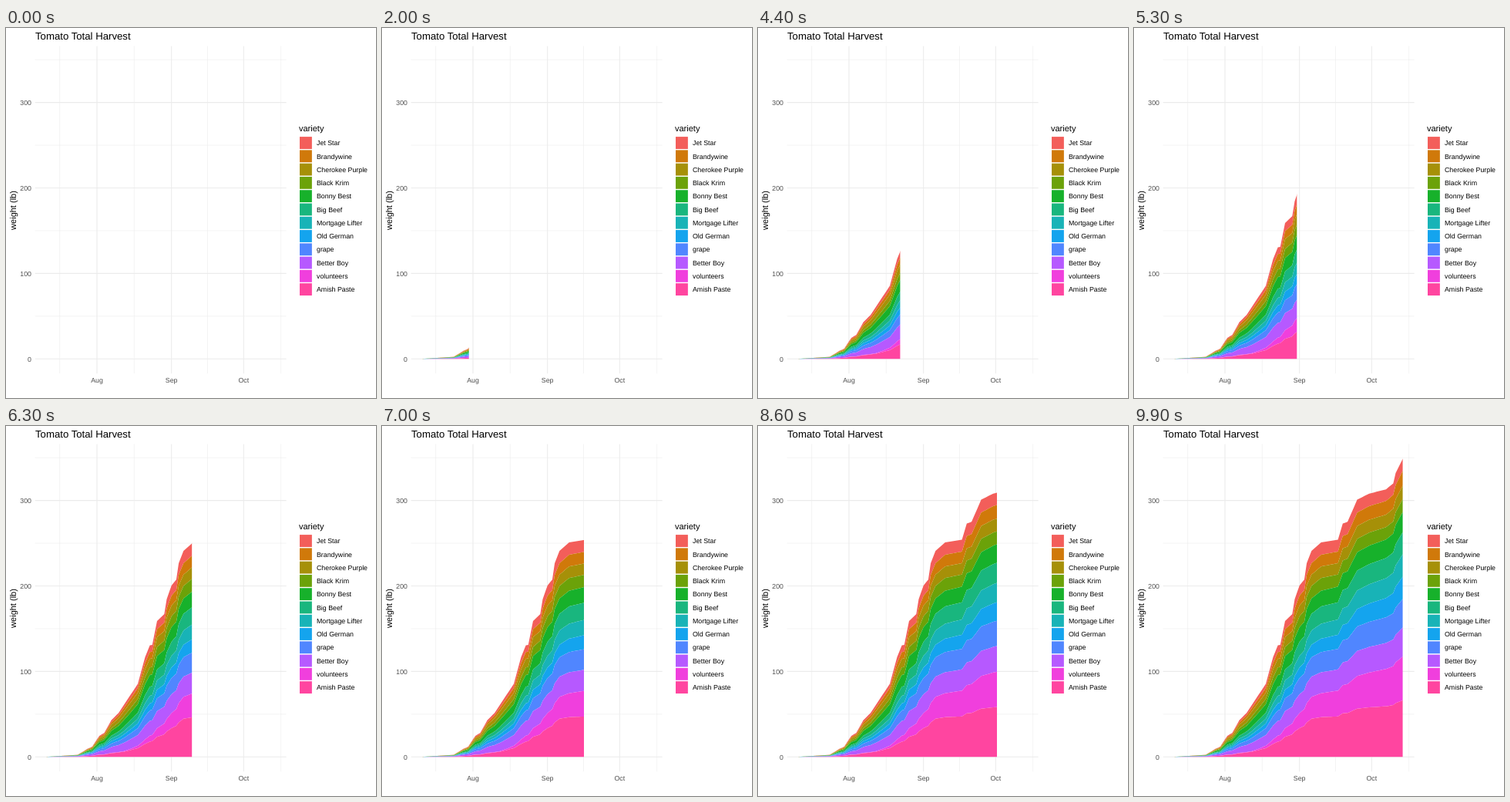
These frames come from a looping animation (480x480 px, 10000 ms). An HTML page:

```html
<!DOCTYPE html>
<html lang="en">
<head>
<meta charset="utf-8">
<title>Tomato Total Harvest</title>
<style>
html, body { margin: 0; width: 100%; height: 100%; overflow: hidden; background: #fff; }
svg { display: block; width: 480px; height: 480px; font-family: "Liberation Sans", Arial, sans-serif; }
text { text-rendering: geometricPrecision; }
.title { font-size: 13.2px; }
.head { font-size: 11px; }
.small { font-size: 8.8px; }
.tick { fill: #4d4d4d; }
.grid { stroke: #ebebeb; }
</style>
</head>
<body>
<svg viewBox="0 0 480 480">
  <clipPath id="clip"><rect id="reveal" x="50" y="20" width="0" height="430"/></clipPath>
  <g id="grid"></g>
  <g id="areas" clip-path="url(#clip)"></g>
  <text class="title" x="38" y="15">Tomato Total Harvest</text>
  <text class="head" transform="translate(13.2 236.5) rotate(-90)" text-anchor="middle">weight (lb)</text>
  <text class="head" x="380" y="134">variety</text>
  <g id="legend"></g>
</svg>
<script>
const NS = "http://www.w3.org/2000/svg";
const LAST_DAY = 95, STEPS = 100, STEP_MS = 100;
const px = day => 52.5 + day * 3.119;
const py = lb => 429.3 - lb * 1.109;

function add(parent, tag, attrs, text) {
  const el = document.createElementNS(NS, tag);
  for (const key in attrs) el.setAttribute(key, attrs[key]);
  if (text) el.textContent = text;
  document.getElementById(parent).append(el);
}

// Top of the stack first; percent of the harvest on each of the share days.
const shareDays = [32, 57, LAST_DAY];
const varieties = [
  { name: "Jet Star", fill: "#f35e5a", shares: [5.9, 6, 4] },
  { name: "Brandywine", fill: "#d0790a", shares: [6.6, 5.5, 5] },
  { name: "Cherokee Purple", fill: "#a69008", shares: [9.5, 5.5, 4.5] },
  { name: "Black Krim", fill: "#6ba209", shares: [7.3, 6.1, 4.3] },
  { name: "Bonny Best", fill: "#17b12b", shares: [13, 7.4, 6.8] },
  { name: "Big Beef", fill: "#19b67e", shares: [8, 8.1, 7.4] },
  { name: "Mortgage Lifter", fill: "#18b3b7", shares: [6.6, 6.9, 7.5] },
  { name: "Old German", fill: "#14a4ee", shares: [6.6, 6.1, 7.5] },
  { name: "grape", fill: "#5086ff", shares: [9.5, 9.4, 9.6] },
  { name: "Better Boy", fill: "#b659ff", shares: [16, 9.8, 9.7] },
  { name: "volunteers", fill: "#f03fdd", shares: [1, 10.7, 14.7] },
  { name: "Amish Paste", fill: "#ff45a0", shares: [10, 18.5, 19] }
];

// Turning points of the whole harvest: day and pounds so far.
const harvest = [[0, .2], [13, 2.5], [17, 9.5], [19, 12], [22, 24.7], [24, 28], [27, 43],
  [30, 51.5], [38, 85.5], [41, 116.5], [43, 130.5], [44, 131], [46, 159], [49, 167],
  [50, 184.5], [52, 200.5], [54, 207.5], [55, 226.5], [57, 241], [61, 251], [68, 254],
  [70, 273], [72, 275], [76, 301], [81, 308], [88, 313], [91, 320], [92, 332], [95, 349]];

// Linear between points, constant before the first one.
function at(points, day) {
  if (day <= points[0][0]) return points[0][1];
  const i = points.findIndex(p => p[0] >= day);
  const [d0, v0] = points[i - 1], [d1, v1] = points[i];
  return v0 + (v1 - v0) * (day - d0) / (d1 - d0);
}

// Upper edges of all bands on one day, ending with the baseline.
function levels(day) {
  const parts = varieties.map(v => at(shareDays.map((d, i) => [d, v.shares[i]]), day));
  const sum = parts.reduce((a, b) => a + b);
  let lb = at(harvest, day);
  const perPart = lb / sum;
  return [lb, ...parts.map(part => lb -= part * perPart)];
}

function drawGrid() {
  const line = (x1, y1, x2, y2, width) =>
    add("grid", "line", { x1, y1, x2, y2, class: "grid", "stroke-width": width });
  const across = (lb, w) => line(37.7, py(lb), 363.6, py(lb), w);
  const down = (day, w) => line(px(day), 23.4, px(day), 448.2, w);
  [50, 150, 250, 350].forEach(lb => across(lb, .53));
  [5.5, 36.5, 67, 97.5].forEach(day => down(day, .53));
  [0, 100, 200, 300].forEach(lb => {
    across(lb, 1.07);
    add("grid", "text", { x: 33, y: py(lb) + 3.2, class: "small tick", "text-anchor": "end" }, String(lb));
  });
  [[21, "Aug"], [52, "Sep"], [82, "Oct"]].forEach(([day, name]) => {
    down(day, 1.07);
    add("grid", "text", { x: px(day), y: 460, class: "small tick", "text-anchor": "middle" }, name);
  });
}

function drawAreas() {
  const days = Array.from({ length: LAST_DAY + 1 }, (_, day) => day);
  const stack = days.map(levels);
  const edge = i => days.map(d => px(d).toFixed(2) + "," + py(stack[d][i]).toFixed(2));
  varieties.forEach(({ fill }, i) => {
    const points = [...edge(i), ...edge(i + 1).reverse()].join(" ");
    add("areas", "polygon", { points, fill });
  });
}

function drawLegend() {
  varieties.forEach(({ name, fill }, i) => {
    const drop = i * 17.28;
    add("legend", "rect", { x: 381, y: 141.1 + drop, width: 15.86, height: 15.86, fill });
    add("legend", "text", { x: 403, y: Math.floor(152.75 + drop), class: "small" }, name);
  });
}

const reveal = document.getElementById("reveal");
const start = performance.now();

function tick() {
  const step = Math.floor((performance.now() - start) / STEP_MS) % STEPS;
  reveal.setAttribute("width", step && 3 + step * 2.987);
  requestAnimationFrame(tick);
}

drawGrid();
drawAreas();
drawLegend();
tick();
</script>
</body>
</html>
```
